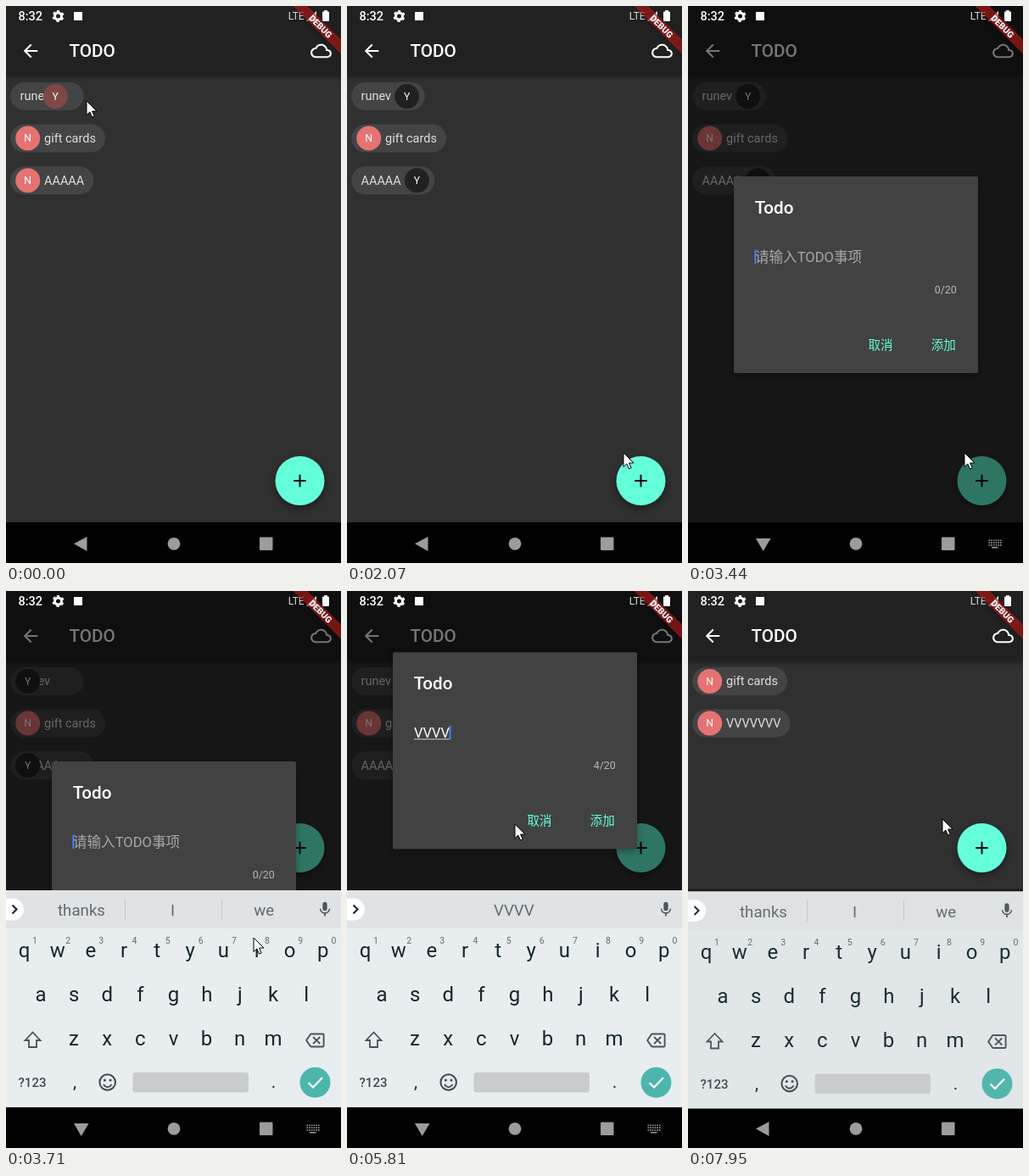
Animation, 395 px wide and 657 px high, one loop 8 s. Source, as an HTML page with a canvas:

```html
<!DOCTYPE html>
<html lang="en">
<head>
<meta charset="utf-8">
<title>Todo list</title>
<style>
html, body { margin: 0; width: 100%; height: 100%; overflow: hidden; background: #000; }
canvas { display: block; }
</style>
</head>
<body>
<canvas id="stage" width="395" height="657"></canvas>
<script>
const c = document.getElementById('stage').getContext('2d');
const LOOP = 8000, SCALE = 1.035;
const FAMILY = 'Roboto, "Noto Sans CJK SC", "Noto Sans CJK", sans-serif';
const ACCENT = '#64ffda';

// Bursts of screen updates: first, last, count. The picture holds in between.
const BURSTS = [[140, 680, 5], [980, 1920, 8], [2070, 2730, 6], [3010, 3980, 8], [4130, 4280, 2],
  [4710, 4710, 1], [5110, 6080, 8], [6220, 7150, 8], [7420, 7540, 2], [7820, 7950, 2]];
const POINTER = [[0, 95, 112], [140, 90, 118], [680, 23, 199], [1248, 23, 199], [1920, 301, 475],
  [2070, 326, 527], [2466, 345, 557], [2870, 345, 557], [3287, 326, 527], [3430, 326, 527],
  [3703, 292, 409], [3980, 210, 315], [4280, 198, 275], [6220, 198, 275], [7010, 300, 269]];
const KEYSTROKES = [5110, 5380, 5600, 5800, 6020, 6220, 6480];

const ICONS = {
  back: 'M20 11H7.83l5.59-5.59L12 4l-8 8 8 8 1.41-1.41L7.83 13H20z',
  cloud: 'M19.35 10.04C18.67 6.59 15.64 4 12 4 9.11 4 6.6 5.64 5.35 8.04 2.34 8.36 0 10.91 0 14c0 3.31 2.69 6 6 6h13c2.76 0 5-2.24 5-5 0-2.64-2.05-4.78-4.65-4.96zM19 18H6c-2.21 0-4-1.79-4-4s1.79-4 4-4h.71C7.37 7.69 9.48 6 12 6c3.04 0 5.5 2.46 5.5 5.5v.5H19c1.66 0 3 1.34 3 3s-1.34 3-3 3z',
  mic: 'M12 14c1.66 0 3-1.34 3-3V5c0-1.66-1.34-3-3-3S9 3.34 9 5v6c0 1.66 1.34 3 3 3zM17.3 11c0 3-2.54 5.1-5.3 5.1S6.7 14 6.7 11H5c0 3.41 2.72 6.23 6 6.72V21h2v-3.28c3.28-.49 6-3.31 6-6.72z',
  erase: 'M22 3H7c-.69 0-1.23.35-1.59.88L0 12l5.41 8.11c.36.53.9.89 1.59.89h15c1.1 0 2-.9 2-2V5c0-1.1-.9-2-2-2zm0 16H7.07L2.4 12l4.66-7H22v14zm-11.59-2L14 13.41 17.59 17 19 15.59 15.41 12 19 8.41 17.59 7 14 10.59 10.41 7 9 8.41 12.59 12 9 15.59z'
};
const ARROW = new Path2D('M0 0V16.5L3.8 13 6.5 19 9.2 17.8 6.6 12H12Z');

const clamp = v => Math.max(0, Math.min(1, v));
const mix = (a, b, p) => a + (b - a) * p;

function snap(t) {
  let last = 0;
  for (const [a, b, n] of BURSTS)
    for (let i = 0; i < n; i++) {
      const at = n > 1 ? mix(a, b, i / (n - 1)) : a;
      if (at <= t) last = at;
    }
  return last;
}

function pointerAt(t) {
  const i = POINTER.findIndex(p => p[0] > t);
  if (i < 0) return POINTER[POINTER.length - 1].slice(1);
  const a = POINTER[i - 1], b = POINTER[i], p = (t - a[0]) / (b[0] - a[0]);
  return [mix(a[1], b[1], p), mix(a[2], b[2], p)];
}

function text(s, x, y, size, color = '#fff', weight = 400, align = 'left') {
  c.font = `${weight} ${size}px ${FAMILY}`;
  c.textAlign = align;
  c.fillStyle = color;
  c.fillText(s, x, y);
}
function rect(x, y, w, h, color, r = 0) {
  c.fillStyle = color;
  c.beginPath();
  c.roundRect(x, y, w, h, r);
  c.fill();
}
function disc(x, y, r, color) {
  c.fillStyle = color;
  c.beginPath();
  c.arc(x, y, r, 0, 7);
  c.fill();
}
function fillPath(d, color) {
  c.fillStyle = color;
  c.fill(new Path2D(d));
}
function line(d, color, width) {
  c.strokeStyle = color;
  c.lineWidth = width;
  c.stroke(new Path2D(d));
}
function icon(name, x, y, size, color) {
  c.save();
  c.translate(x, y);
  c.scale(size / 24, size / 24);
  c.translate(-12, -12);
  fillPath(ICONS[name], color);
  c.restore();
}
function shadow(color, blur, y) {
  c.shadowColor = color;
  c.shadowBlur = blur;
  c.shadowOffsetY = y;
}

// done: how far the toggle has changed colour; slide: where the avatar is
function chip(label, row, done = 0, slide = done) {
  const y = 106.4 + 48 * SCALE * row, on = done > 0;
  c.font = `400 ${14 * SCALE}px ${FAMILY}`;
  const w = c.measureText(label).width + 51;
  rect(5.2, y - 16.5, w, 33, '#444', 16.5);
  text(label, on ? 16.5 : 45, y + 5, 14 * SCALE, '#e0e0e0');
  const x = mix(25.7, 5.2 + w - 21, slide), k = done * done;
  disc(x, y, 14.5, `rgb(${mix(229, 33, k)},${mix(115, 33, k)},${mix(115, 33, k)})`);
  text(on ? 'Y' : 'N', x, y + 4.3, 12.2, '#fff', 400, 'center');
}

function drawApp(t, raised) {
  rect(0, 0, 395, 610, '#303030');
  c.save();
  shadow('rgba(0,0,0,.4)', 5, 2);
  rect(0, 0, 395, 82, '#212121');
  c.restore();
  icon('back', 29, 53, 24 * SCALE, '#fff');
  text('TODO', 74.5, 60, 20 * SCALE, '#fff', 500);
  icon('cloud', 371.5, 53, 24 * SCALE, '#fff');

  if (t < 7820) {
    const rebuild = t < 3700 ? 1 : clamp((t - 3704) / 180);
    const first = clamp((t + 130) / 180), third = clamp((t - 930) / 180);
    chip('runev', 0, first, Math.min(first, rebuild));
    chip('gift cards', 1);
    chip('AAAAA', 2, third, Math.min(third, rebuild));
  } else {
    chip('gift cards', 0);
    chip('VVVVVVV', 1);
  }

  const y = raised ? 303 : 560;
  c.save();
  shadow('rgba(0,0,0,.4)', 9, 4);
  disc(346.5, y, 29, ACCENT);
  c.restore();
  line(`M339.2 ${y}H353.8M346.5 ${y - 7.3}V${y + 7.3}`, '#111', 2.1);
}

function drawDialog(t, typed, fade) {
  rect(0, 0, 395, 610, `rgba(0,0,0,${0.54 * fade})`);
  c.save();
  c.globalAlpha = fade;
  c.translate(0, -128.7 * clamp((t - 3704) / 100));
  c.save();
  shadow('rgba(0,0,0,.3)', 8, 3);
  rect(54, 201, 288, 232, '#424242', 2);
  c.restore();
  text('Todo', 78.8, 245, 20 * SCALE, '#fff', 500);

  const size = 16 * SCALE, x = 79, cleared = t >= 7420;
  text('V'.repeat(typed), x, 302, size);
  const w = c.measureText('V'.repeat(typed)).width;
  if (typed) rect(x, 303, w, 1, '#ccc');
  else if (!cleared) text('请输入TODO事项', x, 302, size, '#a8a8a8');
  if (t < 4100 || t >= 4700) rect(x + w - 0.6, 287.5, 2, 16.5, '#4285f4');
  text(typed + '/20', 316.8, 339, 12 * SCALE, '#b8b8b8', 400, 'right');

  if (t >= 7000) rect(268, 381.5, 66, 37.5, 'rgba(100,255,218,.07)', 2);
  text('取消', 212.5, 405, 14 * SCALE, ACCENT);
  text('添加', 286.8, 405, 14 * SCALE, ACCENT);
  c.restore();
}

function drawBanner() {
  c.save();
  c.translate(395, 0);
  c.rotate(Math.PI / 4);
  c.save();
  shadow('rgba(0,0,0,.5)', 6, 0);
  rect(-45, 28, 90, 12, 'rgba(183,28,28,.63)');
  c.restore();
  text('DEBUG', 0, 37.7, 10.4, '#fff', 900, 'center');
  c.restore();
}

function drawStatus() {
  text('8:32', 14.5, 17, 14 * SCALE, '#fff', 500);
  c.strokeStyle = '#fff';
  c.lineWidth = 3;
  c.beginPath();
  c.arc(61.5, 12, 4, 0, 7);
  c.stroke();
  c.save();
  c.setLineDash([3.2, 3.083]);
  c.lineWidth = 2;
  c.beginPath();
  c.arc(61.5, 12, 6, -1.837, 4.446);
  c.stroke();
  c.restore();
  rect(80, 7, 10, 10, '#fff');
  text('LTE', 332.8, 16, 12, '#ddd');
  fillPath('M354 17.5H366V6Z', '#fff');
  rect(373, 6.5, 8, 11.5, '#fff', 1);
  rect(375.2, 5, 3.6, 2, '#fff');
}

function drawNav(typing) {
  const gray = '#9c9c9c';
  rect(0, 609, 395, 48, '#000');
  fillPath(typing ? 'M80 628H97.5L88.7 643Z' : 'M80 634.3L95.5 626V643Z', gray);
  disc(198, 634.3, 7.4, gray);
  rect(299, 626.5, 15.5, 15.5, gray, 1);
  if (!typing) return;
  for (let row = 0; row < 3; row++)
    for (let i = 0; i < 6; i++) rect(354.5 + i * 2.7, 629.5 + row * 2.8, 1.6, 1.6, gray);
  rect(358, 638, 7.5, 1.5, gray);
}

function drawKeyboard(shift, alpha, word) {
  const ink = '#14272e', soft = '#5f6b71', dark = '#46535a';
  c.save();
  c.beginPath();
  c.rect(0, 352, 395, 259);
  c.clip();
  c.globalAlpha = alpha;
  c.translate(0, shift);
  rect(0, 353, 395, 256, '#e8edf0');
  rect(0, 353, 395, 45, '#dfe3e6');
  rect(-10, 362.5, 31, 26, '#fff', 13);
  line('M7.5 370.5L12.5 375.5L7.5 380.5', ink, 2.1);
  icon('mic', 376, 375.5, 21, '#4a565c');
  if (word) text(word, 196.8, 383, 18.7, soft, 400, 'center');
  else {
    ['thanks', 'I', 'we'].forEach((s, i) => text(s, 89 + 107.6 * i, 383, 18.7, soft, 400, 'center'));
    rect(140, 363, 1, 25, '#c2c7ca');
    rect(254, 363, 1, 25, '#c2c7ca');
  }

  [['qwertyuiop', 21.5], ['asdfghjkl', 41], ['zxcvbnm', 80]].forEach(([keys, x], row) =>
    [...keys].forEach((k, i) => {
      text(k, x + 39.15 * i, 432 + 52 * row, 24, ink, 400, 'center');
      if (!row) text((i + 1) % 10, x + 12.5 + 39.15 * i, 416, 10.5, soft, 400, 'center');
    }));

  line('M31.5 520.5L22.5 530H27V538H36V530H40.5Z', dark, 1.8);
  icon('erase', 364.3, 530, 22.5, dark);
  text('?123', 31, 585, 15, '#3c4a50', 500, 'center');
  text(',', 81, 586, 21, ink, 400, 'center');
  text('.', 315.5, 586, 21, ink, 400, 'center');
  line('M129 579.5A9.3 9.3 0 1 1 110.4 579.5A9.3 9.3 0 1 1 129 579.5M114.8 582Q119.7 588.5 124.6 582', '#3c4a50', 2);
  disc(116.4, 577, 1.5, '#3c4a50');
  disc(123, 577, 1.5, '#3c4a50');
  rect(149.5, 568, 136.5, 23.5, '#c8cccf', 3);
  disc(364.5, 579.7, 18, '#4db6ac');
  line('M356.5 580L362 585.5L373 574', '#fff', 2.2);
  c.restore();
}

function drawPointer(t) {
  c.save();
  c.translate(...pointerAt(t));
  c.fillStyle = '#fff';
  c.fill(ARROW);
  c.strokeStyle = '#000';
  c.lineWidth = 1;
  c.stroke(ARROW);
  c.restore();
}

function draw(now) {
  const t = snap(now % LOOP);
  const keys = clamp((t - 3430) / 270), closing = t >= 7900;
  const fade = clamp(Math.min(t - 2980, 7880 - t) / 150);
  const strokes = KEYSTROKES.filter(k => k <= t).length;

  drawApp(t, t >= 3700);
  if (fade) drawDialog(t, t < 7420 ? strokes : 0, fade);
  drawStatus();
  drawBanner();
  drawNav(t > 3280 && !closing);
  if (t > 3430) {
    if (closing) rect(0, 351.5, 395, 259, '#1c1c1e');
    drawKeyboard(closing ? 1.5 : 80 * (1 - keys) ** 2, closing ? 0.97 : Math.sqrt(keys),
      t < 7820 ? 'V'.repeat(strokes) : '');
  }
  drawPointer(t);
}

function tick() {
  draw(performance.now());
  requestAnimationFrame(tick);
}
tick();
</script>
</body>
</html>
```
